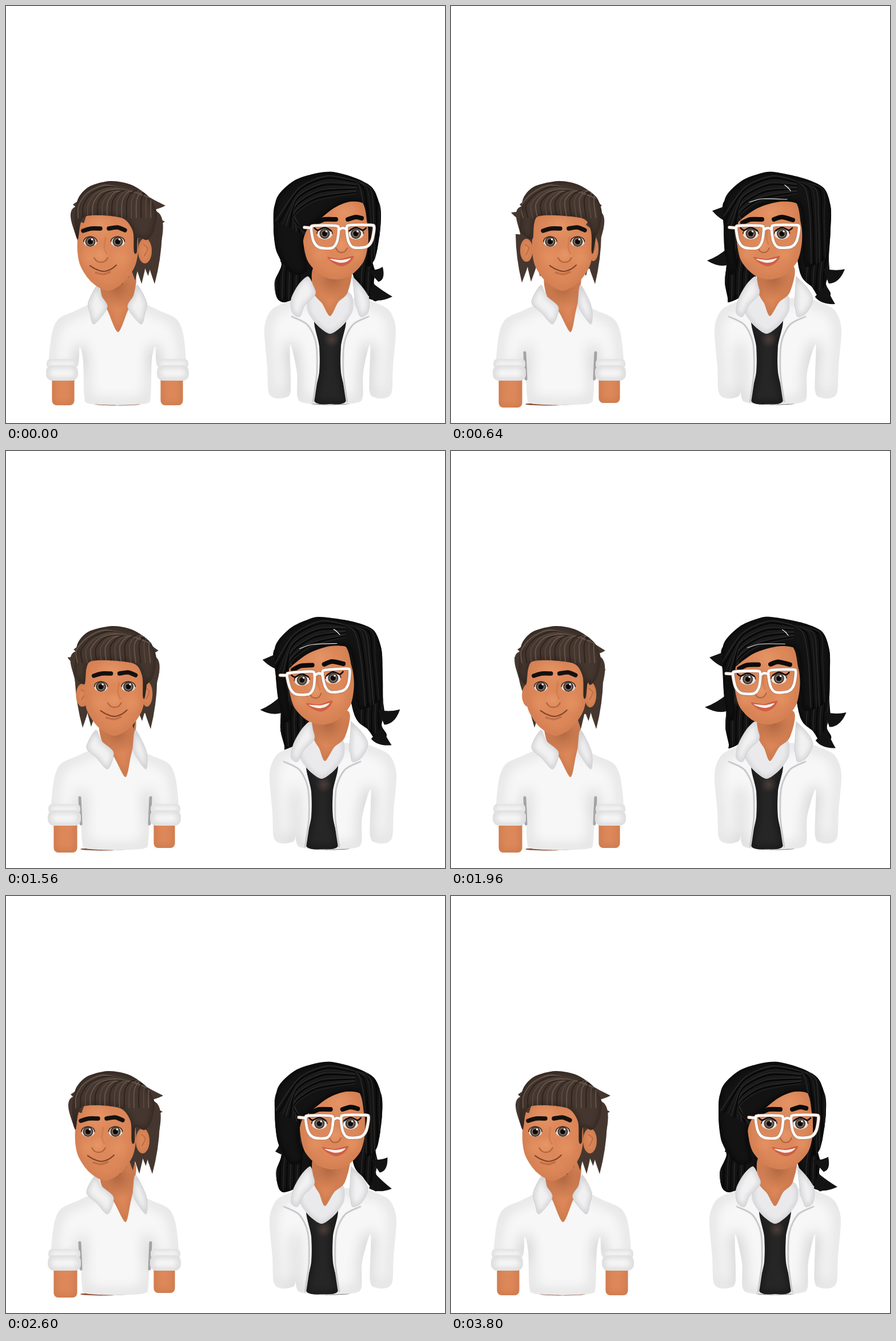
An HTML page with a canvas that plays this animation: 768 by 729 pixels, repeating every 3.84 s.

```html
<!DOCTYPE html>
<html lang="en">
<head>
<meta charset="utf-8">
<title>Two characters</title>
<style>
html, body { margin: 0; width: 100%; height: 100%; overflow: hidden; background: #fff; }
canvas { display: block; }
</style>
</head>
<body>
<canvas id="stage" width="768" height="729"></canvas>
<script>
const ctx = document.getElementById('stage').getContext('2d');
const LOOP = 3840;
const SKIN = '#dd885a', SKIN_SHADE = '#b5683f';
const CLOTH = '#f7f7f7', CLOTH_SHADE = '#919196';
const BROWN = '#45372f', BLACK = '#131313';

// Keys are [time, value] pairs, eased between neighbours.
const turnKeys = [[0, 0], [600, 1], [3240, 1], [3800, 0], [LOOP, 0]];
const coatKeys = [[0, 0], [640, 1], [2600, 1], [3240, .8], [3800, 0], [LOOP, 0]];
const manYaw = [[0, 0], [640, 1], [1160, 1.05], [1960, .46], [2600, 0], [3240, .75], [3800, 0], [LOOP, 0]];
const womanYaw = [[0, 0], [640, 1], [1160, 1], [1960, 1.1], [2600, .28], [3240, .28], [3800, .03], [LOOP, 0]];
const womanTilt = [[0, 0], [640, 0], [1160, -6], [1960, -1.5], [2600, 0], [LOOP, 0]];

const mix = (a, b, t) => a + (b - a) * t;

function track(keys, time) {
  const i = Math.max(1, keys.findIndex(k => k[0] >= time));
  const [t0, a] = keys[i - 1], [t1, b] = keys[i];
  const u = (time - t0) / (t1 - t0);
  return mix(a, b, u * u * (3 - 2 * u));
}

// A point [x, y, depth] slides sideways by its depth as the form turns.
const bend = (points, t) => points.map(([x, y, depth = 0]) => [x + depth * t, y]);
const flip = (points, cx) => points.map(([x, y, depth]) => [2 * cx - x, y, depth]);
// Closed form from one half, given as [distance from axis, y].
const mirror = (half, cx) => spline([
  ...half.map(([d, y]) => [cx - d, y]),
  ...half.filter(p => p[0]).reverse().map(([d, y]) => [cx + d, y])]);

function spline(p, closed = true) {
  const n = p.length, path = new Path2D();
  const at = i => p[closed ? (i + n) % n : Math.min(n - 1, Math.max(0, i))];
  path.moveTo(...p[0]);
  for (let i = 0; i < (closed ? n : n - 1); i++) {
    const [a, b, c, d] = [at(i - 1), at(i), at(i + 1), at(i + 2)];
    path.bezierCurveTo(
      b[0] + (c[0] - a[0]) / 7, b[1] + (c[1] - a[1]) / 7,
      c[0] - (d[0] - b[0]) / 7, c[1] - (d[1] - b[1]) / 7, ...c);
  }
  if (closed) path.closePath();
  return path;
}
const curve = points => spline(points, false);

function fill(path, color) {
  ctx.fillStyle = color;
  ctx.fill(path);
}
function line(path, color, width) {
  ctx.strokeStyle = color;
  ctx.lineWidth = width;
  ctx.lineCap = ctx.lineJoin = 'round';
  ctx.stroke(path);
}
function clipped(path, paint) {
  ctx.save();
  ctx.clip(path);
  paint();
  ctx.restore();
}
// Fills a path and darkens it softly along the inside of its edge.
function solid(path, color, shade, blur = 15, width = 4) {
  fill(path, color);
  clipped(path, () => {
    const m = ctx.getTransform();
    m.e -= 2000;
    ctx.setTransform(m);
    ctx.shadowColor = shade;
    ctx.shadowBlur = blur;
    ctx.shadowOffsetX = 2000;
    line(path, '#000', width);
  });
}
function oval(x, y, rx, ry = rx) {
  const path = new Path2D();
  path.ellipse(x, y, rx, ry, 0, 0, 7);
  return path;
}
function box(cx, y0, halfWidth, y1, radius) {
  const path = new Path2D();
  path.roundRect(cx - halfWidth, y0, 2 * halfWidth, y1 - y0, radius);
  return path;
}
function glow(x, y, r, color) {
  const g = ctx.createRadialGradient(x, y, 0, x, y, r);
  g.addColorStop(0, color + 'aa');
  g.addColorStop(1, color + '00');
  fill(oval(x, y, r), g);
}

// Tapered, bent tuft of hair from a root to a tip.
function lock(x, y, tipX, tipY, width, sag, color) {
  const len = Math.hypot(tipX - x, tipY - y) || 1;
  const nx = -(tipY - y) / len, ny = (tipX - x) / len;
  const mx = (x + tipX) / 2, my = (y + tipY) / 2;
  const side = k => [mx + nx * (sag + k * width * .4), my + ny * (sag + k * width * .4)];
  const path = new Path2D();
  path.moveTo(x - nx * width / 2, y - ny * width / 2);
  path.quadraticCurveTo(...side(-1), tipX, tipY);
  path.quadraticCurveTo(...side(1), x + nx * width / 2, y + ny * width / 2);
  fill(path, color);
}
function strands(hair, count, colors, shape) {
  clipped(hair, () => {
    for (let i = 0; i < count; i++) line(curve(shape(i)), colors[i % colors.length], 1.8);
  });
}

function eye(x, y, rx, ry) {
  const white = oval(x, y, rx, ry);
  fill(white, '#eae5e1');
  clipped(white, () => {
    fill(oval(x, y, 9), '#41342e');
    fill(oval(x, y, 7), '#78675c');
    fill(oval(x, y, 4.5), '#0c0a09');
    fill(oval(x + 3, y - 4, 1.7), '#fff');
  });
  const lid = new Path2D();
  lid.ellipse(x, y, rx, ry, 0, Math.PI, 2 * Math.PI);
  line(lid, '#3a231a', 1.6);
}
function nose(x, y, w, side) {
  glow(x, y - 2, 15, '#ec9d70');
  line(curve([[x + side * 8, y - 32], [x + side * 6, y - 15], [x + side * 10, y - 4]]), '#c4743f77', 3);
  line(curve([[x - w, y + 3], [x - w * .6, y + 9], [x, y + 11], [x + w * .6, y + 9], [x + w, y + 3]]), '#ad633d', 2);
}

// Shoulders, arms and trunk in one outline; shift(side) moves each part.
function bust(cx, arm, trunk, shift) {
  const half = side => [
    ...arm.map(([d, y]) => [cx + side * d + shift(side), y]),
    ...trunk.map(([d, y]) => [cx + side * d + shift(0), y])];
  solid(spline([...half(-1), ...half(1).reverse()]), CLOTH, CLOTH_SHADE, 24);
}
function collar(points) {
  const flap = spline(points);
  solid(flap, '#f1f1f2', '#88888e', 9, 2);
  line(flap, '#c6c6ca', .8);
}
function neckline(points, shadowX, shadowY) {
  const neck = spline(points);
  solid(neck, SKIN, SKIN_SHADE, 12);
  clipped(neck, () => glow(shadowX, shadowY, 38, '#9c5834'));
}

function manBody(t) {
  const cx = 195;
  const shift = side => t * (side < 0 ? 4 : side > 0 ? -13 : -4);
  for (const side of [-1, 1])
    solid(box(cx + side * 95 + shift(side), 640, 19.5 - side * t, 698 - side * 4 * t, 8), SKIN, SKIN_SHADE, 12);
  fill(oval(cx - 25 * t, 696, 40, 2.5), '#8b4f34');

  bust(cx,
    [[30, 515], [74, 533], [103, 547], [115, 574], [119, 630], [96, 640], [70, 630], [66, 596]],
    [[60, 620], [58, 682], [50, 695], [0, 698]], shift);

  for (const side of [-1, 1]) {
    const x = cx + side * 97 + shift(side), half = 28 - side * t;
    ctx.globalAlpha = Math.max(0, t) * .8;
    line(curve([[cx + side * 62 + shift(0), 606], [cx + side * 60 + shift(0), 652]]), '#929296', 5);
    ctx.globalAlpha = 1;
    solid(box(x, 617, half - 1, 634, 7), CLOTH, CLOTH_SHADE, 9, 2);
    solid(box(x, 628, half, 655, 11), CLOTH, CLOTH_SHADE, 12, 3);
  }

  neckline(bend([[167, 465], [167, 505], [179, 535, 10], [196, 570, 13], [212, 535, 6], [224, 505], [224, 465]], t), 195, 492);
  const flap = tip => [[160, 488, -3], [144, 518, -3], [147, 537, tip / 2], [154, 556, tip], [177, 527, 11], [167, 507]];
  collar(bend(flap(24), t));
  collar(bend(flip(flap(8), cx), t));
}

function manHead(t) {
  // Nape tufts swing from behind the far side to both sides of the neck.
  for (let i = 0; i < 9; i++) {
    const x = mix(mix(165, 256, i / 8), mix(130, 246, i / 8), t);
    const ragged = 8 * Math.sin(i * 2.4 + .5);
    lock(x, 400, x + mix(4, (i - 4) * 1.5, t), 480 + ragged, 34, 0, BROWN);
  }
  fill(spline(bend([[124, 350], [121, 398], [150, 440, -14], [230, 460, 4], [264, 440, -14], [265, 360, -3]], t)), BROWN);

  const ears = [[142 - 10 * t, 427, 11, 20], [243 + 6 * t, 428 - 4 * t, 12 - 3 * t, 22]];
  for (const [x, y, rx, ry] of ears) {
    solid(oval(x, y, rx, ry), SKIN, SKIN_SHADE, 9, 3);
    line(curve([[x - 2, y - ry * .5], [x + rx * .4, y - 4], [x - 1, y + ry * .4]]), '#bb6f46', 2);
  }

  const cx = 178 + 17 * t;
  solid(mirror([[38, 364], [51, 390], [53, 428], [47, 456], [28, 483], [0, 498]], cx), SKIN, SKIN_SHADE);

  ctx.save();
  ctx.translate(26 * t, 0);
  glow(165, 385, 26, '#e89a6b');
  for (const x of [148, 200]) glow(x, 440, 20, '#e69565');
  eye(147.5, 412, 11.5, 9);
  eye(195.5, 412, 12, 9);
  line(curve([[135, 393], [149, 389], [165, 389]]), '#15110f', 7.5);
  line(curve([[180, 389], [195, 387], [208, 392]]), '#15110f', 7.5);
  nose(166 + 7 * t, 437, 12, 1);
  line(curve([[147, 454], [157, 460], [170, 464], [184, 460], [193, 453]]), '#7c4329', 2.2);
  line(curve([[157, 466], [170, 469], [182, 465]]), '#bf7049', 3.5);
  ctx.restore();

  const tip = (a, b) => mix(a, b, t);
  lock(240, 342, tip(279, 264), 349, 26, 5, BROWN);
  lock(244, 372, tip(278, 267), tip(377, 390), 26, 5, BROWN);
  lock(140, 345, tip(117, 120), 347, 26, -4, BROWN);
  lock(140, 368, tip(119, 105), 361, 24, -4, BROWN);

  const hair = spline(bend([
    [126, 408, 16], [121, 394], [120, 366, 2], [127, 335], [147, 315], [183, 306, 6], [220, 313, 4], [250, 334, 4],
    [264, 362], [258, 395], [246, 409], [231, 404, 22], [229, 430, 20], [224, 430, 22], [222, 394, 23],
    [206, 372, 26], [170, 366, 12], [138, 368, 14], [130, 382, 15]], t));
  solid(hair, BROWN, '#241b17', 9);
  strands(hair, 16, ['#66564b', '#2b221d', '#57483f'], i => {
    const x = 126 + i * 8.5;
    return [[x, 370], [x + 1 - 4 * t, 349 - i], [x + 16, 327 - i * .4], [x + 48, 313 + i * 2.4], [x + 92, 323 + i * 3]];
  });
}

function womanBody(t) {
  const cx = 567, front = cx - 14 * t;
  fill(oval(cx, 695, 34, 2.5), '#70706f');
  bust(cx,
    [[47, 511], [80, 519], [104, 533], [115, 565], [110, 630], [108, 674], [98, 685], [80, 685], [69, 672], [70, 592]],
    [[58, 640], [57, 684], [45, 694], [0, 697]],
    side => t * (side < 0 ? 9 : side > 0 ? 1 : -2));

  solid(mirror([[26, 545], [19, 595], [19, 640], [28, 690], [0, 696]], front), '#272626', '#080808', 12);
  glow(front + 3, 583, 14, '#5c4842');
  solid(mirror([[32, 500], [40, 530], [27, 553], [12, 567], [0, 573]], front - t), '#eaeaec', '#8f8f97', 9, 2);
  for (const side of [-1, 1]) {
    const lapel = curve([[67, 543], [40, 557], [25, 588], [23, 640], [30, 692]].map(([d, y]) => [front + side * d, y]));
    line(lapel, '#e3e3e5', 4);
    line(lapel, '#b9b9bd', 1.3);
  }

  neckline(bend([[540, 455], [538, 500], [553, 520, -5], [567, 542, -9], [581, 518, -7], [598, 500, -5], [602, 455, -3]], t), 572 - 8 * t, 477);
  const flap = [[528, 473, 4], [512, 487, 5], [499, 512, 4], [501, 536, -2], [514, 543, -4], [522, 524, -2], [541, 504, -2], [537, 488]];
  collar(bend(flap, t));
  collar(bend(flip(flap, cx).map(([x, y, d]) => [x, y, d * 1.5 - 8]), t));
}

function tilted(angle, paint) {
  ctx.save();
  ctx.translate(560, 475);
  ctx.rotate(angle * Math.PI / 180);
  ctx.translate(-560, -475);
  paint();
  ctx.restore();
}

function womanBackHair(t) {
  const left = spline(bend([[535, 330], [475, 340, 4], [468, 385, 9], [472, 425, 8], [482, 452], [470, 482, 9],
    [474, 510, 10], [488, 518, -2], [515, 506, -6], [538, 470, -4]], t));
  const right = spline(bend([[600, 330], [650, 340, 9], [655, 385, 9], [641, 440, 20], [646, 465, 16], [644, 486, 12],
    [658, 504, 6], [645, 516, 4], [622, 492, 10], [605, 460, 4]], t));
  for (const fall of [left, right]) {
    solid(fall, BLACK, '#000', 8);
    const x0 = fall === left ? 474 + 8 * t : 624;
    strands(fall, 8, ['#252525', '#060606'], i => [0, 1, 2, 3].map(k =>
      [x0 + i * 6 + 4 * Math.sin(k * 1.8), 375 + k * 46]));
  }
  lock(488, 436, 480 - 32 * t, 447 - 2 * t, 28, -9, BLACK);
  lock(494, 362, 474 - 17 * t, 358, 34, -4, BLACK);
  lock(642 + 14 * t, 472, 659 + 30 * t, 456 + 4 * t, 28, 9, BLACK);
  lock(638 + 8 * t, 498, 676 - 4 * t, 508 + 13 * t, 28, 6, BLACK);
}

function glasses() {
  const lens = [[534, 388], [540, 384], [576, 384], [582, 389], [579, 412], [570, 423], [548, 422], [538, 411]];
  const parts = [
    spline(lens),
    spline(flip(lens, 589).map(([x, y]) => [x, y - 1])),
    curve([[582, 391], [589, 388], [596, 390]]),
    curve([[522, 387], [534, 388]])];
  for (const [color, width] of [['#a8765a', 6], ['#fcfcfc', 4.6]])
    for (const part of parts) line(part, color, width);
}

function womanHead(t) {
  const cx = 577 - 20 * t, slide = -33 * t;
  solid(mirror([[40, 338], [55, 380], [57, 412], [49, 446], [27, 470], [0, 478]], cx), SKIN, SKIN_SHADE);

  ctx.save();
  ctx.translate(slide, 0);
  glow(592, 362, 26, '#e89a6b');
  for (const x of [550, 615]) glow(x, 433, 17, '#e69565');
  for (const [x, side] of [[557.5, -1], [612, 1]]) {
    eye(x, 398, 13.5, 10);
    line(curve([[x - side * 11, 393], [x, 387], [x + side * 12, 392], [x + side * 18, 388]]), '#0d0909', 2.6);
  }
  line(curve([[543, 379], [557, 373], [577, 373]]), '#0d0b0b', 8);
  line(curve([[598, 373], [612, 369], [622 + 9 * t, 371 + 3 * t]]), '#0d0b0b', 8);
  nose(587 - 7 * t, 420, 10, 1 - 2 * t > 0 ? -.8 : .8);
  fill(spline([[562, 439], [575, 441], [586, 442], [608, 437], [601, 449], [587, 455], [572, 449]]), '#cf5f45');
  fill(spline([[567, 442], [587, 444], [603, 441], [596, 447], [585, 449], [574, 446]]), '#f6f0ec');
  ctx.restore();

  const hair = spline(bend([
    [500, 468, -12], [475, 430, 4], [468, 382, 9], [474, 335, 6], [503, 306, 5], [540, 293], [572, 290, -8],
    [612, 301, 4], [641, 318, 11], [654, 350, 10], [655, 388, 9], [646, 440, 10], [632, 455, -12], [634, 410, -19],
    [633, 370, -18], [627, 346, -20], [602, 342, -26], [574, 353, -37], [544, 377, -41], [526, 392, -30],
    [519, 420, -22], [527, 462, -27]], t));
  solid(hair, BLACK, '#000', 8);
  const partX = 612 - 8 * t;
  strands(hair, 18, ['#282828', '#050505', '#202020'], i => i < 12
    ? [[partX, 306 + i * 2], [563 - i * 2, 297 + i * 4], [513 - i, 318 + i * 5], [472 + i * 6, 375 + i * 3]]
    : [[partX, 306], [548 + i * 6, 320], [568 + i * 5, 370], [570 + i * 5, 450]]);

  // Bright slits show at the hairline once the head faces left.
  ctx.globalAlpha = Math.min(1, Math.max(0, t * 2 - 1));
  line(curve([[584, 313], [589, 317], [594, 323]]), '#f4f4f4', 1.3);
  line(curve([[522, 343], [545, 337], [588, 338]]), '#e8e8e8', 1.1);
  ctx.globalAlpha = 1;

  ctx.save();
  ctx.translate(slide - 2 * t, 0);
  glasses();
  ctx.restore();
}

function draw(time) {
  fill(box(384, 0, 384, 729, 0), '#fff');

  const turn = track(turnKeys, time), yaw = track(manYaw, time);
  manBody(turn);
  ctx.save();
  ctx.translate(-4 * turn * (1 - Math.min(1, yaw)), 0);
  manHead(yaw);
  ctx.restore();

  const look = track(womanYaw, time), tilt = track(womanTilt, time);
  tilted(tilt, () => womanBackHair(look));
  womanBody(track(coatKeys, time));
  tilted(tilt, () => womanHead(look));
}

const start = performance.now();
function tick() {
  draw((performance.now() - start) % LOOP);
  requestAnimationFrame(tick);
}
tick();
</script>
</body>
</html>
```
